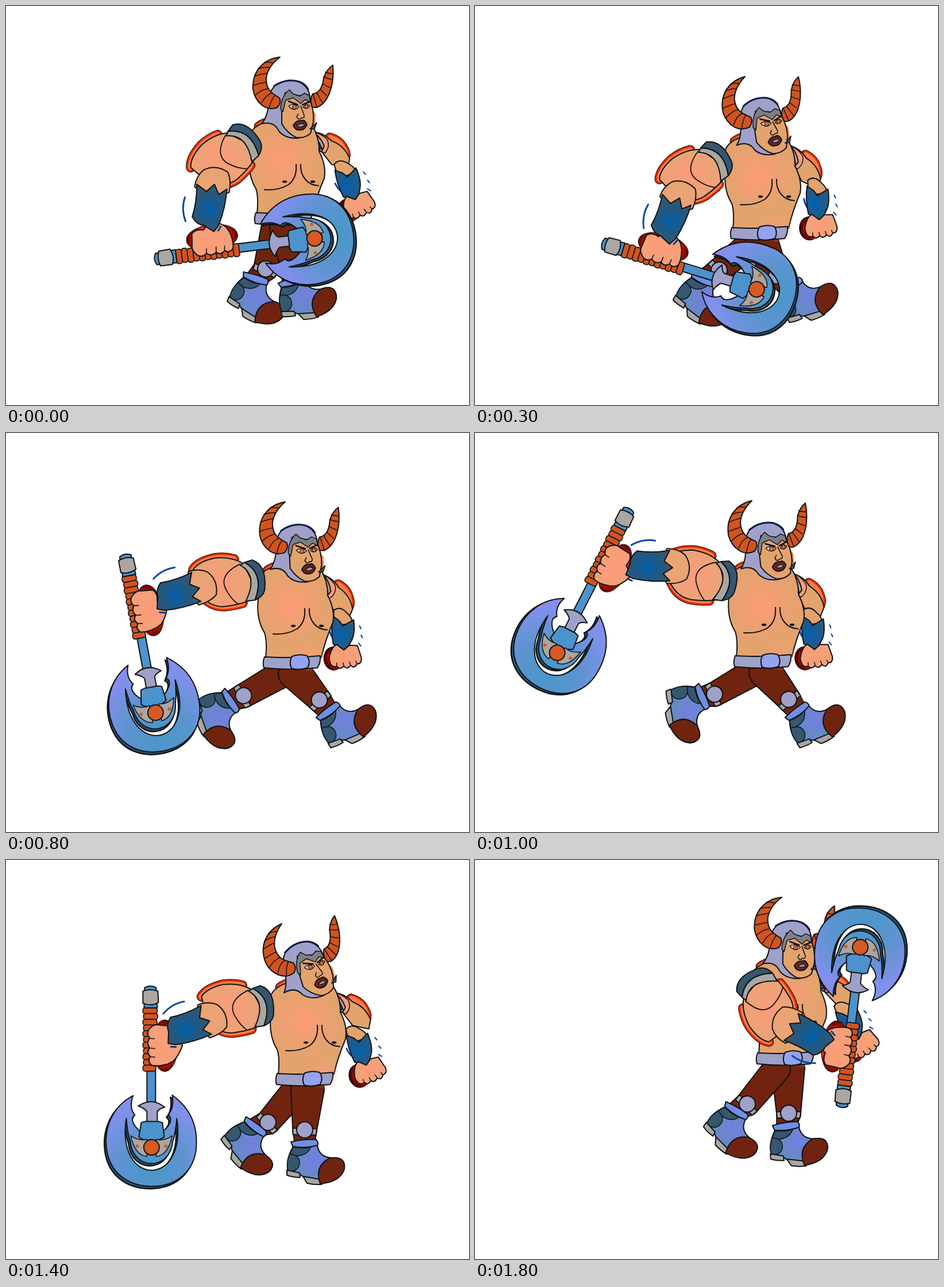
Write an HTML page with a canvas that moves like this. It is 806 px wide and 695 px high and loops after 1900 ms.

```html
<!DOCTYPE html>
<html lang="en">
<head>
<meta charset="utf-8">
<title>Walking axe warrior</title>
<style>
html, body { margin: 0; width: 100%; height: 100%; overflow: hidden; background: #fff; }
canvas { display: block; }
</style>
</head>
<body>
<canvas id="stage" width="806" height="695"></canvas>
<script>
const ctx = document.getElementById('stage').getContext('2d');
const LOOP = 1900, STEP = 100;
const INK = '#101315', SKIN = '#e3a36d', PINK = '#fd9b79', ORANGE = '#d1541f';
const SLATE = '#35576f', LILAC = '#9fa1c8', GREY = '#aaa6a2', BROWN = '#70240f', STEEL = '#4c93cd';

// One value per key time; the values between are linear.
const times = [0, 300, 600, 1000, 1200, 1400, 1800];
const body = { x: [-12, 0, 0, 6, 14, 25, 45], y: [-32, -6, 0, -4, -2, -20, -56] };
const head = {
  x: [477, 470, 490, 482, 455, 480, 534],
  y: [89, 123, 122, 118, 137, 111, 65],
  a: [0, -8.5, .6, -6.2, -26, -17.3, .6]
};
const arm = {
  x: [413, 417, 420, 430, 440, 440, 490],
  y: [238, 270, 257, 257, 265, 255, 218],
  upper: [130, 137, 152, 180, 224, 165, 53],
  elbow: [128, 136, 148, 196, 223, 163, 52],
  fore: [101, 113, 147, 182, 203, 162, 30],
  reach: [94, 110, 135, 182, 211, 155, 27],
  length: [112, 109, 108, 118, 95, 107, 107],
  axe: [-97, -73, -48, 27, 86, 0, -173]
};
const fist = {
  x: [614, 602, 587, 594, 612, 633, 675],
  y: [348, 384, 391, 389, 386, 368, 322],
  a: [-19, -4, 0, -4, -10, -18, -25]
};
const rearLeg = {
  x: [434, 397, 385, 394, 401, 433, 454],
  y: [476, 478, 475, 460, 455, 466, 438],
  a: [22, 27, 50, 70, 77, 41, 35],
  kneeX: [452, 425, 410, 417, 426, 456, 474],
  kneeY: [458, 460, 460, 455, 453, 457, 425]
};
const frontLeg = {
  x: [498, 550, 562, 562, 569, 520, 542],
  y: [481, 489, 486, 486, 490, 495, 465],
  a: [-14, -27.5, -33, -33, -30, 0, -4],
  kneeX: [500, 525, 545, 546, 551, 520, 546],
  kneeY: [455, 470, 466, 464, 470, 470, 441]
};

function sample(track, t) {
  let i = 0;
  while (i < times.length - 2 && t >= times[i + 1]) i++;
  const k = (t - times[i]) / (times[i + 1] - times[i]);
  const pose = {};
  for (const name in track) pose[name] = track[name][i] + (track[name][i + 1] - track[name][i]) * k;
  return pose;
}

const rad = deg => deg * Math.PI / 180;
const polar = (p, deg, r) => ({ x: p.x + Math.cos(rad(deg)) * r, y: p.y + Math.sin(rad(deg)) * r });

function place(x, y, deg, draw, pivotX = 0, pivotY = 0) {
  ctx.save();
  ctx.translate(x, y);
  ctx.rotate(rad(deg));
  ctx.translate(-pivotX, -pivotY);
  draw();
  ctx.restore();
}

function paint(path, fill, width = 2) {
  if (fill) { ctx.fillStyle = fill; ctx.fill(path, 'evenodd'); }
  if (width) line(path, width);
}
function line(path, width = 2, color = INK) {
  ctx.lineWidth = width;
  ctx.strokeStyle = color;
  ctx.stroke(path);
}
const shape = (d, fill, width) => paint(new Path2D(d), fill, width);
const stroke = (d, width, color) => line(new Path2D(d), width, color);

function oval(x, y, rx, ry, fill, width) {
  const p = new Path2D();
  p.ellipse(x, y, rx, ry, 0, 0, 7);
  paint(p, fill, width);
}
function radial(x, y, r, ...colors) {
  const g = ctx.createRadialGradient(x, y, 0, x, y, r);
  colors.forEach((c, i) => g.addColorStop(i / (colors.length - 1), c));
  return g;
}
function glow(d) {
  stroke(d, 17, '#2a0500');
  stroke(d, 15, '#dd2c08');
  stroke(d, 9, '#ff7d42');
}

function segment(a, b, ra, rb) {
  const dir = Math.atan2(b.y - a.y, b.x - a.x), q = Math.PI / 2, p = new Path2D();
  p.arc(a.x, a.y, ra, dir + q, dir - q);
  p.arc(b.x, b.y, rb, dir - q, dir + q);
  p.closePath();
  return p;
}

function drawBoot() {
  shape('M-24-4Q-2-9 20-8Q26-1 20 5Q0 9-20 6Z', '#6f8fe4');
  shape('M-20 4Q2 8 22 2Q25 24 50 24Q74 26 68 46Q58 66 28 64L-4 56L-10 51L-29 48Q-34 28-20 4Z',
    radial(18, 26, 50, '#747fe0', '#5e8fb6'));
  shape('M-20 5Q0 9 11 4Q4 22-18 20L-26 17Z', SLATE, 1.5);
  shape('M-26 17Q-5 20-10 38Q-15 49-29 47Q-33 33-26 17Z', SLATE, 1.5);
  shape('M-31 45L-9 50L-8 58Q-20 58-31 54Z', GREY);
  shape('M-3 56L30 62V70Q16 71 4 68Z', GREY);
  shape('M27 69Q16 38 44 24Q72 20 69 43Q62 66 27 69Z', BROWN);
}

function drawLeg(leg, hip, hipRadius) {
  const knee = { x: leg.kneeX, y: leg.kneeY };
  const thigh = segment(hip, knee, hipRadius, 20), shin = segment(knee, leg, 20, 16);
  line(thigh, 4);
  line(shin, 4);
  paint(thigh, BROWN, 0);
  paint(shin, BROWN, 0);
  const dir = Math.atan2(leg.y - hip.y, leg.x - hip.x) * 180 / Math.PI;
  place(knee.x, knee.y, dir, () => {
    shape('M-3-21L8-20L9 20L-2 21Z', GREY);
    oval(0, 0, 14, 14, LILAC);
  });
  place(leg.x, leg.y, leg.a, drawBoot);
}

function drawFarArm(b, f) {
  place(b.x + 557, b.y + 262, f.a * .8, () => {
    glow('M575 266Q590 275 593 290Q596 299 593 305');
    shape('M548 248Q568 256 576 272Q596 286 599 310L592 325L566 312L555 286Z', SKIN);
    shape('M546 246Q564 256 570 268Q572 282 560 290L552 284Z', PINK, 1.5);
    shape('M546 244Q560 258 562 278L555 286L544 272Z', GREY);
    shape('M546 244Q554 258 557 282L548 276Z', SLATE);
  }, 557, 262);
  place(f.x, f.y, f.a, () => {
    stroke('M-26-50Q-25-38-18-31', 3, '#0b45a8');
    stroke('M27-53L29-48M29-37L31-32M24-23L28-18', 2, '#0b3f9a');
    oval(-20, 2, 18, 21, radial(-13, 2, 23, '#ff9a60', '#f04a16', '#d00b00', '#300000'), 0);
    shape('M-17-82Q-5-90 6-76Q15-67 15-58L-18-55Z', SKIN);
    shape('M-19-72L-8-63L-2-54L17-64Q19-40 12-28L1-10L-20-23Q-24-48-19-72Z',
      radial(-8, -40, 30, '#0460ad', '#2c587c'));
    shape('M-28 2Q-24-18-14-22L-2-12L8-20L22-19L28 2Q29 13 20 13Q15 22 9 15Q2 23-3 16Q-10 23-15 16Q-26 20-28 2Z',
      radial(0, 0, 32, PINK, '#eca579'));
    stroke('M9 15L7 9M-3 16L-4 10M-15 16L-15 10M20 13L18 8', 1.5);
  });
}

function drawTorso() {
  glow('M452 242Q462 234 470 235');
  shape('M434 264Q436 242 470 232L545 240Q558 262 557 285Q570 310 566 332Q552 365 546 393H449Q452 365 447 350Q432 326 436 290Z',
    radial(494, 303, 62, PINK, '#ef9f72', SKIN));
  oval(526, 393, 30, 24, radial(526, 393, 29, 'rgba(253,155,121,.7)', 'rgba(253,155,121,0)'), 0);
  stroke('M462 352Q486 354 504 343Q519 331 517 308M525 308Q524 323 533 334Q541 344 556 345', 2);
  oval(497, 338, 4, 1.7, INK, 1);
  oval(546, 338, 4, 1.7, INK, 1);
  shape('M447 392Q495 395 544 390Q545 402 539 411Q490 416 446 411Q443 402 447 392Z', LILAC);
  shape('M495 391Q508 386 521 390Q528 400 522 411Q506 416 494 412Q489 401 495 391Z', '#94a3ef');
}

function drawHead() {
  shape('M569 103C572 135 562 170 540 177L531 176Q529 160 534 153C548 152 552 135 553 125Q558 110 569 103Z', ORANGE);
  stroke('M556 115Q562 118 568 118M553 123Q560 127 567 128M551 135Q558 140 564 142M547 145Q553 152 558 156M541 151Q546 160 551 169M535 154Q538 166 541 176', 1.5);
  shape('M532 178L539 188L538 210L530 216Z', '#f28850', 0);
  shape('M445 205Q453 196 456 180Q455 150 470 137Q490 125 510 132Q527 140 529 158L530 170L490 212L510 230Q487 232 475 218Q467 200 445 205Z', LILAC);
  stroke('M467 139Q489 125 511 132Q521 136 526 145', 3, '#101a4a');
  shape('M480 176L486 151L527 160Q537 180 535 202L530 222Q520 231 505 229Q489 221 480 205Z', SKIN);
  shape('M478 179Q479 157 493 146L500 153L511 157L520 152L528 156L530 168L521 163L513 170L500 160L487 164L482 184Z', '#7d7f8b', 1.5);
  shape('M529 214L541 203L537 214Z', SLATE, 1.5);
  stroke('M492 166L508 172M516 172L528 167', 2.6);
  shape('M492 174Q501 168 510 176Q501 185 492 174Z', '#d7cbd0', 1.3);
  shape('M517 176Q523 168 529 174Q524 182 517 176Z', '#d7cbd0', 1.3);
  oval(502, 176, 3.6, 3.8, '#dc6937', 1);
  oval(523, 175, 3, 3.5, '#dc6937', 1);
  stroke('M513 174Q517 185 519 190Q520 196 514 195Q509 200 506 193L509 188', 1.6);
  shape('M500 208Q506 198 513 200Q520 196 524 207Q519 217 511 216Q504 217 500 208Z', '#6f2414');
  shape('M506 209Q515 202 520 207Q515 213 506 209Z', '#8d9abf', 1.2);
  shape('M477 89C450 92 428 112 430 145C434 168 452 184 472 177Q480 168 476 160C462 152 452 145 453 125Q456 105 477 89Z', ORANGE);
  stroke('M431 138Q444 134 453 133M434 155Q446 145 457 144M445 169Q452 155 462 152M458 178Q462 162 468 156M433 122Q445 118 455 117M439 109Q450 106 459 107M450 98Q457 97 464 99', 1.5);
}

function drawAxe() {
  const blade = new Path2D('M-32-90C-70-70-85-30-77 10C-68 50-35 68 0 68C38 68 70 48 77 8C82-30 72-65 36-91Q40-70 29-56Q38-50 28-36L18-25H-18L-28-36Q-38-50-29-56Q-40-70-32-90Z' +
    'M-44-50C-62 70 62 70 44-50Q42-25 37-10C32 41-32 41-37-10Q-42-25-44-50Z');
  ctx.save();
  ctx.translate(-3, 4);
  paint(blade, '#285575', 2.5);
  ctx.restore();

  shape('M-8-135H7V-70H-8Z', STEEL);
  for (let i = 0; i < 11; i++) {
    const p = new Path2D();
    p.roundRect(-15 + (i % 2), -243 + i * 10, 25 - i * .25, 10.5, 4);
    paint(p, ORANGE, 1.7);
  }
  shape('M-12-278Q-2-284 8-278L10-243H-13Z', STEEL);
  shape('M-15-272Q-2-277 11-272L12-252Q-1-245-15-251Z', GREY);

  paint(blade, radial(0, 38, 112, '#4797c9', '#5c94cf', '#8290ec'));
  shape('M-18-43Q0-50 19-43L22-18Q10-10 0-12Q-12-10-22-18Z', STEEL);
  shape('M-23-72Q0-88 23-70Q12-67 10-62V-45H-8V-62Q-12-68-23-72Z', LILAC);
  for (const side of [-1, 1]) {
    ctx.save();
    ctx.scale(side, 1);
    shape('M36-20Q22-10 8-14V16Q29 14 36-20Z', GREY, 1.5);
    oval(25, -2, 3, 3, '#d75c28', 0);
    ctx.restore();
  }
  oval(0, 0, 13.5, 13.5, '#d65a24');
}

function drawHand() {
  oval(23, -177, 23, 45, radial(18, -177, 46, '#ff9860', '#ff6b30', '#dc1700', '#520000'), 1);
  ctx.save();
  ctx.restore();
}
function drawFingers() {
  shape('M-4-206Q5-216 14-213L34-211Q42-204 38-190L54-178Q48-160 38-150L28-145Q10-140 0-143Q-8-150-2-158Q-10-166-3-173Q-10-182-3-190Q-10-199-4-206Z',
    radial(18, -178, 40, PINK, '#f3a178'));
  stroke('M-2-158L6-157M-3-173L6-172M-3-190L5-189', 1.6);
}

function drawUpperArm() {
  glow('M18 43Q32 51 50 53Q80 54 92 42M90 0Q80-27 55-33Q35-36 22-35');
  shape('M5 32Q20 48 50 53Q80 54 92 42L92 0Q80-28 55-33Q20-38-10-30Z',
    radial(52, 8, 52, PINK, '#e9a476'));
  stroke('M10 32Q55 23 43-10Q40-22 31-34', 1.8);
  shape('M10 30Q-16 5 16-33L0-35Q-28 5 2 33Z', GREY);
  shape('M2 33Q-28 5 0-35Q-18-32-22-18Q-34 20-12 34Z', SLATE);
}

function drawForearm() {
  shape('M24 34Q5 35-8 24Q-22 5-12-18Q0-27 22-27L40 0Z', radial(12, 5, 42, '#efa478', SKIN));
  shape('M19 31Q48 25 76 28Q88 18 87 5L94-14L82-20Q50-26 17-22L29-10L13 1L28 12Z',
    radial(57, 0, 44, '#0460ad', '#205982', '#3a566b'));
  stroke('M45 47Q66 50 86 38', 3, '#0a48a8');
  stroke('M83-24L91-21', 3, '#0b3a90');
}

function drawNearArm(a) {
  const elbow = polar(a, a.elbow, 76), hand = polar(elbow, a.reach, a.length);
  const inHand = draw => place(hand.x, hand.y, a.axe, draw, 17, -178);
  inHand(drawHand);
  inHand(drawAxe);
  inHand(drawFingers);
  place(a.x, a.y, a.upper, drawUpperArm);
  place(elbow.x, elbow.y, a.fore, drawForearm);
}

function render(t) {
  ctx.fillStyle = '#fff';
  ctx.fillRect(0, 0, 806, 695);
  ctx.lineJoin = ctx.lineCap = 'round';
  const b = sample(body, t), h = sample(head, t);
  drawFarArm(b, sample(fist, t));
  const legs = [
    () => drawLeg(sample(rearLeg, t), { x: b.x + 480, y: b.y + 420 }, 23),
    () => drawLeg(sample(frontLeg, t), { x: b.x + 500, y: b.y + 420 }, 28)
  ];
  if (t >= 1600) legs.reverse();
  legs.forEach(draw => draw());
  place(b.x, b.y, 0, drawTorso);
  place(h.x, h.y, h.a, drawHead, 477, 89);
  drawNearArm(sample(arm, t));
}

function tick() {
  render(Math.floor(performance.now() % LOOP / STEP) * STEP);
  requestAnimationFrame(tick);
}
tick();
</script>
</body>
</html>
```
